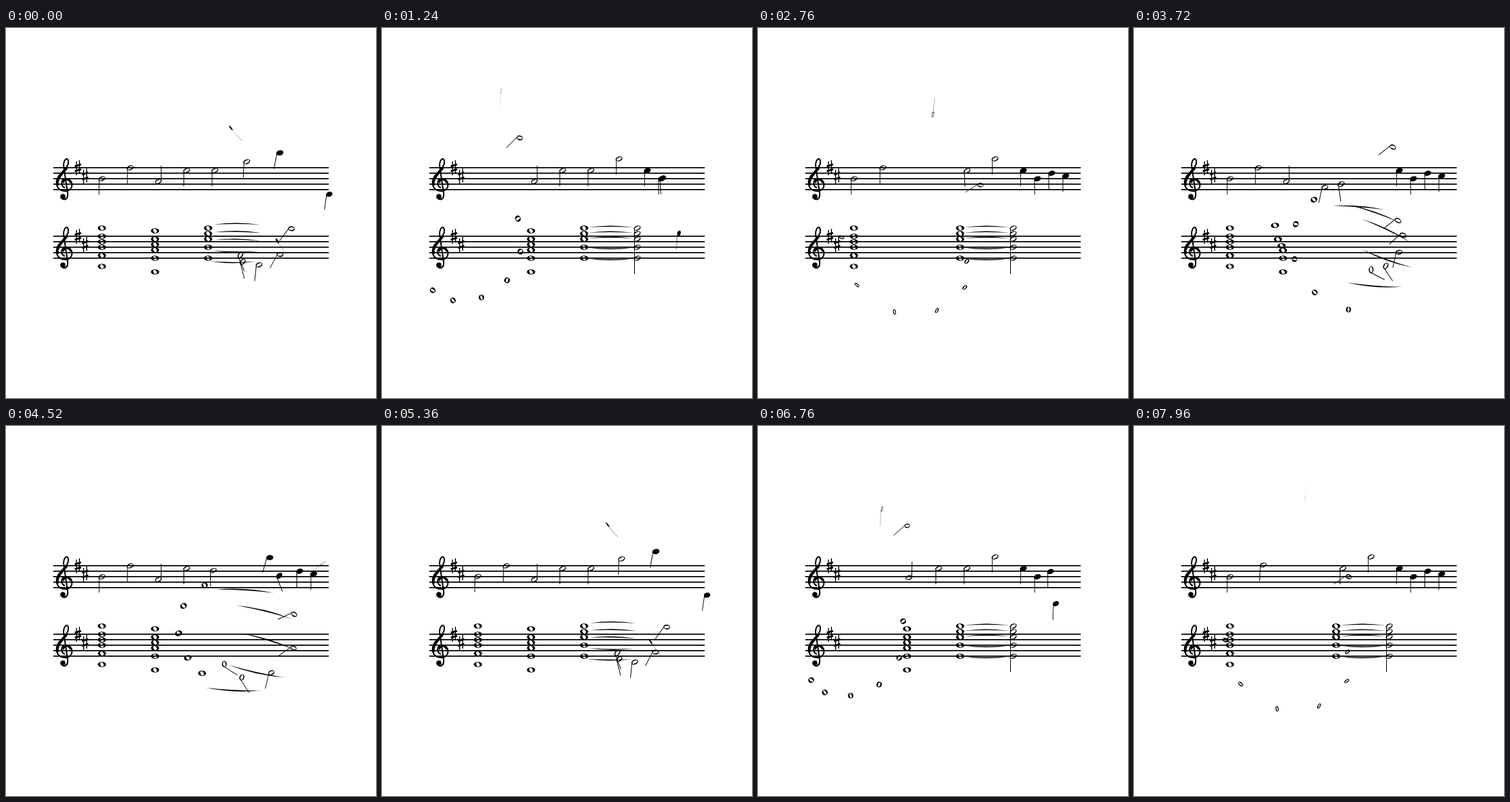
Write an HTML page with a canvas that moves like this. It is 540 px wide and 540 px high and loops after 8 s.

```html
<!DOCTYPE html>
<html lang="en">
<head>
<meta charset="utf-8">
<title>Drifting notes</title>
<style>
  html, body { margin: 0; width: 100%; height: 100%; overflow: hidden; background: #fff; }
  canvas { display: block; width: 540px; height: 540px; }
</style>
</head>
<body>
<canvas id="stage" width="540" height="540"></canvas>
<script>
const ctx = document.getElementById('stage').getContext('2d');
const LOOP = 8000;
const CYCLE = 5333;        // four bars
const BAR = CYCLE / 4;
const AWAY = 2183;         // time a note spends off its place
const RAD = Math.PI / 180;

// ---- shapes, centred on the note head ----
function head(rx, ry, tilt, hole) {
  const p = new Path2D();
  p.ellipse(0, 0, rx, ry, tilt, 0, 2 * Math.PI);
  if (hole) {
    p.closePath();
    p.moveTo(hole[0] * Math.cos(hole[2]), hole[0] * Math.sin(hole[2]));
    p.ellipse(0, 0, ...hole, 0, 2 * Math.PI);
  }
  return p;
}
const HEADS = {
  whole: head(6, 3.8, 0, [3.2, 2.3, 1]),
  half: head(5.2, 3.4, -0.35, [4.1, 1.9, -0.5]),
  quarter: head(5.2, 3.6, -0.35)
};
const TIE = new Path2D('M-33 0Q0 -5 33 0Q0 -2 -33 0Z');
const CLEF = new Path2D('M86 233C80 231 79 221 87 220C99 220 100 237 87 238C73 238 71 225 77 216' +
  'C83 208 92 203 91 194C89 187 84 193 84 201L90 241C91 252 82 252 81 247');
const CLEF_BOLD = new Path2D('M75.5 230C73 220 82 213 89 204M83 226C85 219 92 219 95 226');

function drawShape(kind) {
  if (kind === 'tieUp') return ctx.fill(TIE);
  if (kind === 'tieDown') { ctx.scale(1, -1); return ctx.fill(TIE); }
  if (kind === 'halfUp') { ctx.rotate(Math.PI); kind = 'half'; }
  ctx.fill(HEADS[kind], 'evenodd');
  if (kind !== 'whole') ctx.fillRect(-4.5, 0.5, 1, 22.5);
}

function drawSharp(x, y) {
  ctx.lineWidth = 1.4;
  ctx.beginPath();
  for (const side of [-1, 1]) {
    ctx.moveTo(x + side * 2.2, y - 10 - side);
    ctx.lineTo(x + side * 2.2, y + 10 - side);
  }
  ctx.stroke();
  ctx.lineWidth = 2.8;
  ctx.beginPath();
  for (const d of [-3.6, 3.6]) {
    ctx.moveTo(x - 4.6, y + d + 1.4);
    ctx.lineTo(x + 4.6, y + d - 1.4);
  }
  ctx.stroke();
}

function drawStaff(dy) {
  ctx.setTransform(1, 0, 0, 1, 0, dy);
  for (let y = 204; y <= 236; y += 8) ctx.fillRect(69, y - 1, 402, 1.7);
  ctx.lineWidth = 2;
  ctx.stroke(CLEF);
  ctx.lineWidth = 3.3;
  ctx.stroke(CLEF_BOLD);
  ctx.beginPath();
  ctx.arc(83, 246, 3.8, 0, 2 * Math.PI);
  ctx.fill();
  drawSharp(105, 204);
  drawSharp(115.5, 216);
}

// ---- score ----
const items = [];
function add(kind, x, y, leave, back, angle, reach) {
  items.push({ kind, x, y, leave, span: back - leave, angle, reach, tie: kind.startsWith('tie') });
}

// Each note: kind, height, direction and reach of its drift.
let beat = 0;
for (const [kind, y, angle, reach] of [
  ['half', 220, -82, 140], ['half', 204, -45, 85],
  ['halfUp', 224, -86, 135], ['half', 208, 32, 80],
  ['half', 208, 98, 20], ['half', 191, 0, 120],
  ['quarter', 208, -75, 33], ['quarter', 220, -134, 110],
  ['quarter', 212, 125, 150], ['quarter', 216, 80, 150]
]) {
  const back = 2167 + beat * BAR / 2;
  add(kind, 140 + 41.2 * beat, y, back - AWAY, back, angle, reach);
  beat += kind === 'quarter' ? 0.5 : 1;
}

// Heads run from low to high and drift apart like a fan.
function chord(bar, kind, heights, angle, step, reach) {
  heights.forEach((y, j) => {
    const back = 2280 + BAR * bar + 75 * j;
    const leave = back - AWAY - (bar === 3 ? BAR : 0);
    add(kind, 140 + 77.5 * bar, y, leave, back, angle + step * j, reach);
  });
}
const tied = [336, 320, 308, 300, 292];
chord(0, 'whole', [348, 332, 320, 312, 304, 292], 150, -30, 75);
chord(1, 'whole', [356, 336, 324, 316, 308, 296], -20, 40, 100);
chord(2, 'whole', tied, 82, 42, 80);
chord(3, 'half', tied, 168, -45, 55);
tied.forEach((y, j) =>
  add(j < 2 ? 'tieDown' : 'tieUp', 333.5, y + (j < 2 ? 0.5 : -1), 2763 + 75 * j, 5600, 80 - 40 * j, 55));

// ---- motion: out and back on a clockwise curl, tipping edge-on with distance ----
function pose({ x, y, leave, span, angle, reach, tie }, t) {
  const u = ((t - leave) % CYCLE + CYCLE) % CYCLE / span;
  if (u >= 1) return { x, y, turn: 0, sx: 1, sy: 1 };
  const wave = Math.sin(Math.PI * u), out = wave * wave;
  const way = (angle + 90 * (u - 0.5)) * RAD;
  const lean = (tie ? 25 : 65) * Math.cos(angle * RAD);
  const zoom = 1 + (tie ? 0.3 : 0.08) * out;
  return {
    x: x + reach * out * Math.cos(way),
    y: y + reach * out * Math.sin(way),
    turn: lean * wave * (1 - u) * 1.8 * RAD,
    sx: zoom * (tie ? 1 : Math.cos(out * reach / 80)),
    sy: zoom
  };
}

function draw(t) {
  ctx.setTransform(1, 0, 0, 1, 0, 0);
  ctx.fillStyle = '#fff';
  ctx.fillRect(0, 0, 540, 540);
  ctx.fillStyle = ctx.strokeStyle = '#000';
  drawStaff(0);
  drawStaff(100);
  for (const item of items) {
    const { x, y, turn, sx, sy } = pose(item, t);
    ctx.setTransform(1, 0, 0, 1, x, y);
    ctx.rotate(turn);
    ctx.scale(sx, sy);
    drawShape(item.kind);
  }
}

const begin = performance.now();
function tick() {
  draw((performance.now() - begin) % LOOP);
  requestAnimationFrame(tick);
}
tick();
</script>
</body>
</html>
```
